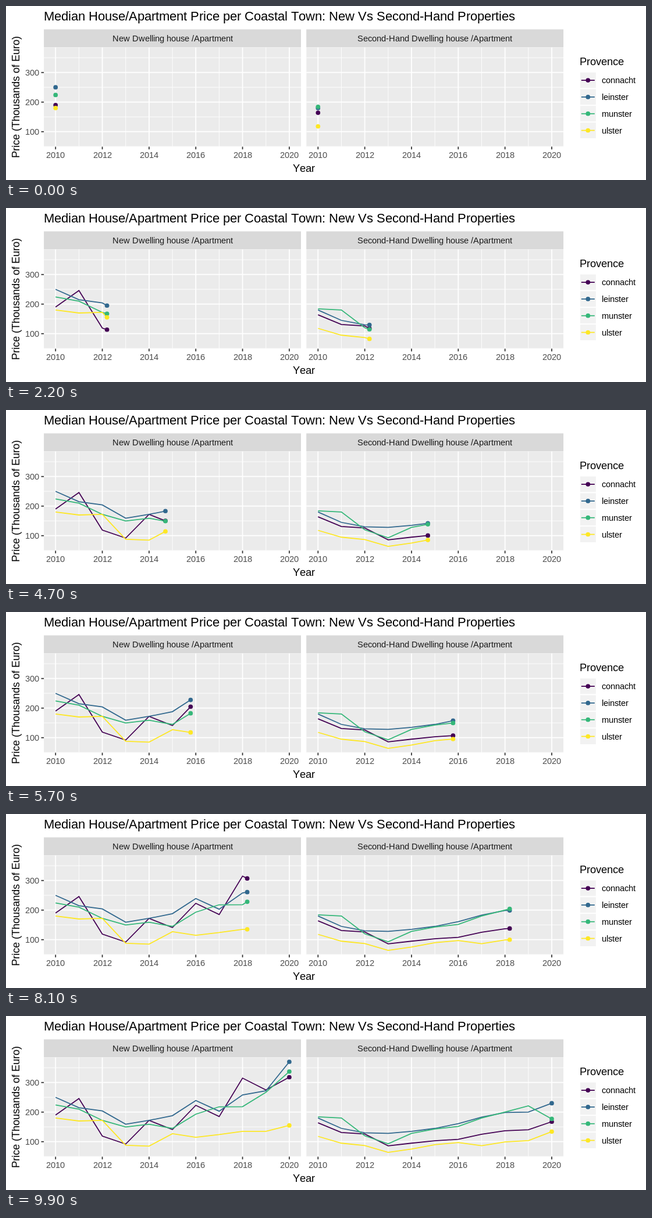
These frames come from a looping animation (1100 px wide and 300 px high, 10000 ms). An HTML page:

```html
<!DOCTYPE html>
<html lang="en">
<head>
<meta charset="utf-8">
<title>Median prices</title>
<style>
html, body { margin: 0; width: 100%; height: 100%; overflow: hidden; background: #fff; }
svg { display: block; width: 1100px; height: 300px; }
text { font-family: "Liberation Sans", Arial, sans-serif; font-kerning: none; }
</style>
</head>
<body>
<svg id="plot" viewBox="0 0 1100 300" xmlns="http://www.w3.org/2000/svg"></svg>
<script>
const STEP = 100, FRAMES = 100;
const SMALL = 44 / 3, MEDIUM = 55 / 3, LARGE = 22;
const THICK = 1.78, THIN = 0.89, DOT = 3.85;
const TOP = 71.2, BOTTOM = 242.6, WIDTH = 441.9, YEAR = 40.17, PAD = 20.1;
const provinces = [
  ['connacht', '#440154'], ['leinster', '#31688E'],
  ['munster', '#35B779'], ['ulster', '#FDE725']
];
const panels = [
  { left: 65.1, title: 'New Dwelling house /Apartment', data: [
    [190, 246, 119, 92, 172, 141, 223, 185, 315, 275, 318],
    [250, 215, 204, 159, 172, 188, 239, 203, 258, 272, 370],
    [224, 210, 172, 149.5, 159, 145, 193, 218, 218.5, 267, 337],
    [180, 170, 172, 88, 85, 127, 115, 124, 135, 135, 155]] },
  { left: 516.2, title: 'Second-Hand Dwelling house /Apartment', data: [
    [164, 131, 126, 86, 95, 103, 108, 125, 137, 140.5, 167.5],
    [180, 145, 130, 128, 135, 145, 161, 183, 198.5, 200, 230],
    [184, 180, 120, 93, 128, 143, 151.5, 180, 200, 221, 177],
    [118, 95, 87, 64, 75, 90, 97, 86.5, 99, 103.5, 134]] }
];

const svg = document.getElementById('plot');
const pen = document.createElement('canvas').getContext('2d');
const yOf = v => 267.7 - 0.51 * v;

function add(tag, attrs, parent = svg) {
  const el = document.createElementNS('http://www.w3.org/2000/svg', tag);
  for (const k in attrs) el.setAttribute(k, attrs[k]);
  return parent.appendChild(el);
}
function rect(x, y, width, height, fill, more, parent) {
  return add('rect', { x, y, width, height, fill, ...more }, parent);
}
function line(x1, y1, x2, y2, stroke, width, parent) {
  return add('line', { x1, y1, x2, y2, stroke, 'stroke-width': width }, parent);
}
function dot(cx, cy, fill, parent) {
  return add('circle', { cx, cy, r: DOT, fill }, parent);
}
// Glyphs advance by whole pixels; align is 0 (start), 0.5 (middle) or 1 (end).
function label(str, x, y, size, fill, align = 0, more = {}) {
  pen.font = `${size}px "Liberation Sans", Arial, sans-serif`;
  const steps = [...str].map(c => Math.round(pen.measureText(c).width));
  let at = Math.round(x - align * steps.reduce((a, b) => a + b));
  const xs = steps.map(w => (at += w) - w);
  add('text', { x: xs.join(' '), y, 'font-size': size, fill, ...more }).textContent = str;
}

const series = [];
function buildPanel({ left, title, data }, index) {
  const x0 = left + PAD, right = left + WIDTH;
  const xOf = year => x0 + YEAR * year;
  rect(left, 40.3, WIDTH, TOP - 40.3, '#D9D9D9');
  label(title, left + WIDTH / 2, 61, SMALL, '#1A1A1A', 0.5);

  const clip = add('clipPath', { id: 'clip' + index });
  rect(left, TOP, WIDTH, BOTTOM - TOP, '#000', {}, clip);
  const area = add('g', { 'clip-path': `url(#clip${index})` });
  rect(left, TOP, WIDTH, BOTTOM - TOP, '#EBEBEB', {}, area);
  const hLine = (v, w) => line(left, yOf(v), right, yOf(v), '#fff', w, area);
  const vLine = (n, w) => line(xOf(n), TOP, xOf(n), BOTTOM, '#fff', w, area);
  for (let v = 50; v <= 350; v += 100) hLine(v, THIN);
  for (let n = 1; n < 10; n += 2) vLine(n, THIN);
  for (let v = 100; v <= 300; v += 100) hLine(v, THICK);
  for (let n = 0; n <= 10; n += 2) {
    vLine(n, THICK);
    line(xOf(n), BOTTOM, xOf(n), BOTTOM + 4.58, '#333', THICK);
    label(String(2010 + n), xOf(n), 262, SMALL, '#4D4D4D', 0.5);
  }

  const paths = data.map((_, i) => add('polyline', {
    fill: 'none', stroke: provinces[i][1], 'stroke-width': THICK
  }, area));
  data.forEach((values, i) => {
    series.push({ values, xOf, path: paths[i], head: dot(0, 0, provinces[i][1], area) });
  });
}

label('Median House/Apartment Price per Coastal Town: New Vs Second-Hand Properties',
  65, 25, LARGE, '#000');
panels.forEach(buildPanel);
for (let v = 100; v <= 300; v += 100) {
  line(60.5, yOf(v), 65.1, yOf(v), '#333', THICK);
  label(String(v), 57, Math.round(yOf(v) + 5.2), SMALL, '#4D4D4D', 1);
}
label('Year', 511.6, 286, MEDIUM, '#000', 0.5);
label('Price (Thousands of Euro)', 0, 0, MEDIUM, '#000', 0,
  { transform: 'translate(22.5 262) rotate(-90)' });

label('Provence', 986, 102, MEDIUM, '#000');
provinces.forEach(([name, color], i) => {
  const y = 128.1 + 28.8 * i;
  rect(985.9, y - 14.4, 28.8, 28.8, '#F2F2F2', { stroke: '#fff', 'stroke-width': THICK });
  line(988.8, y, 1011.8, y, color, THICK);
  dot(1000.3, y, color);
  label(name, 1024, Math.round(y + 5.2), SMALL, '#000');
});

// Each year falls on a whole frame.
const keys = Array.from({ length: 11 }, (_, n) => Math.round(n * (FRAMES - 1) / 10));

function draw(frame) {
  const n = Math.max(0, keys.findIndex(k => k > frame) - 1);
  const year = frame >= FRAMES - 1 ? 10 : n + (frame - keys[n]) / (keys[n + 1] - keys[n]);
  const whole = Math.floor(year);
  for (const { values, xOf, path, head } of series) {
    const a = values[whole], b = values[whole + 1] ?? a;
    const x = xOf(year), y = yOf(a + (b - a) * (year - whole));
    const points = values.slice(0, whole + 1).map((v, i) => [xOf(i), yOf(v)]);
    if (year > whole) points.push([x, y]);
    path.setAttribute('points', points.join(' '));
    head.setAttribute('cx', x);
    head.setAttribute('cy', y);
  }
}

const start = performance.now();
let shown = -1;
function tick() {
  const frame = Math.floor((performance.now() - start) / STEP) % FRAMES;
  if (frame !== shown) draw(shown = frame);
  requestAnimationFrame(tick);
}
tick();
</script>
</body>
</html>
```
